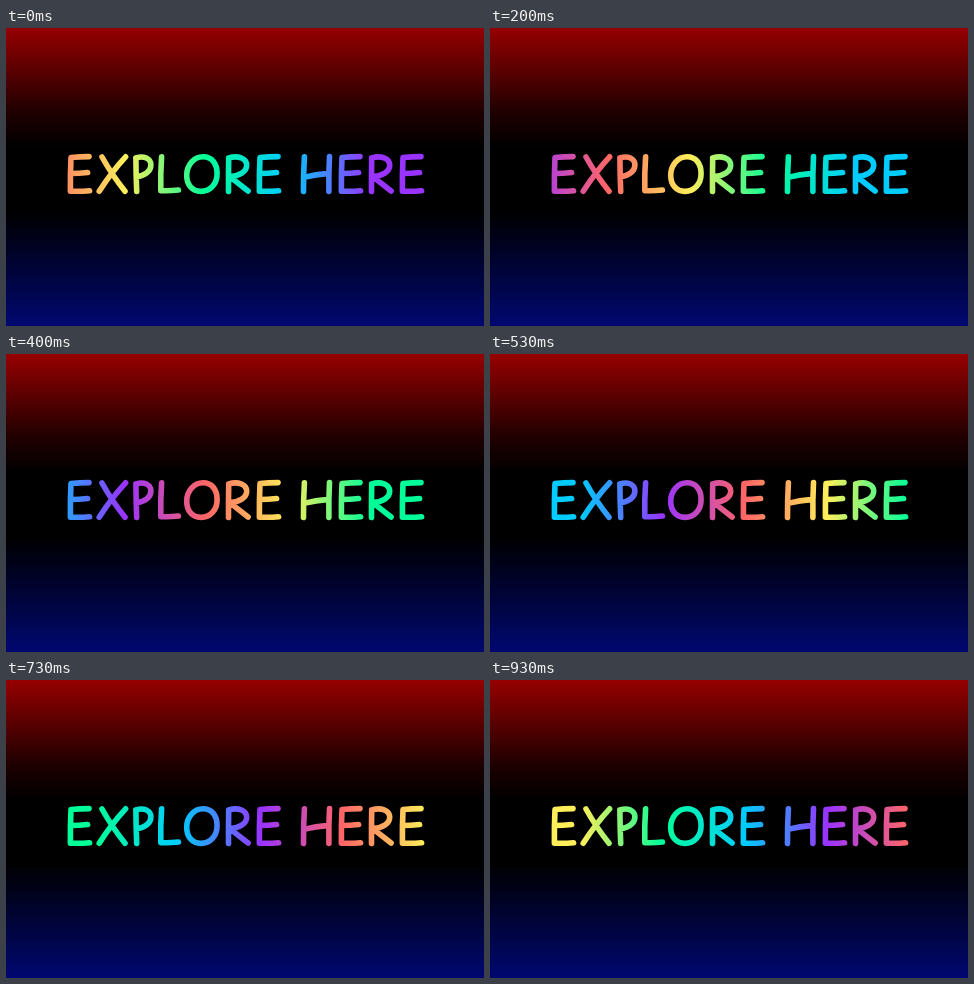
These frames come from a looping animation (478x298 px, 0.99 s). An HTML page:

```html
<!DOCTYPE html>
<html lang="en">
<head>
<meta charset="utf-8">
<title>Explore here</title>
<style>
  html, body { margin: 0; width: 100%; height: 100%; overflow: hidden; background: #000; }
  body { background: linear-gradient(#960000 0, #1e0000 85px, #000 120px, #000 182px, #000116 207px, #000870 298px); }
  svg { display: block; width: 478px; height: 298px; }
</style>
</head>
<body>
<svg viewBox="0 0 478 298" role="img" aria-label="EXPLORE HERE">
  <defs>
    <linearGradient id="rainbow" gradientUnits="userSpaceOnUse" y1="0" y2="0"></linearGradient>
  </defs>
  <path id="word" fill="none" stroke="url(#rainbow)" stroke-width="5.6" stroke-linecap="round" stroke-linejoin="round"/>
</svg>
<script>
  const LOOP = 990, STEPS = 15, PER_COLOR = 3;
  const COLORS = ['#ff6666', '#ffee5a', '#00ff99', '#00ccff', '#9933ff'];
  const LEFT = 36, GAP = 82;

  // Pen strokes of each letter, relative to its left edge and the cap line
  const GLYPHS = {
    E: 'm21 2.6 q-9 0 -18 .9 q-.8 16 -.6 33.6 q10 .4 19.2 -.4 m-18.6 -17.2 q8 -.2 16.6 -1',
    X: 'm6 3 q10 18 23 34.2 m.6 -34.4 q-14 15 -26.4 34.4',
    P: 'm3.4 4 q.1 17 .8 33.4 m-.8 -33.4 c8 -2.6 15 .4 15 7 c0 6.6 -6.6 10.8 -14.4 11.6',
    L: 'm3.6 2.8 q-1.2 17 -.8 33.8 q8 .5 17.6 -.6',
    O: 'm18.6 2.8 c-9 0 -16.4 8 -16.4 18.4 c0 9.6 5.6 16.2 14.2 16.2 c9.4 0 16.2 -7.4 16.2 -18 c0 -10 -5.4 -16.6 -14 -16.6',
    R: 'm3.2 4 q-.3 17 -.2 33.4 m.2 -33.4 c9 -2.8 18 0 18 7.2 c0 6.4 -7.4 10.8 -17 11.4 q9 7 18.4 14.4',
    H: 'm3.4 2.8 q-1 17 -.9 34.6 m26 -34.8 q-.9 17 -.6 34.8 m-25.2 -14 q12 -3 25 -4'
  };
  const LETTERS = [
    ['E', 62], ['X', 90], ['P', 126.5], ['L', 152], ['O', 178.5], ['R', 219.5], ['E', 251],
    ['H', 295], ['E', 333], ['R', 362.5], ['E', 394]
  ];
  document.getElementById('word').setAttribute('d',
    LETTERS.map(([c, x]) => `M${x} 126 ${GLYPHS[c]}`).join(' '));

  const gradient = document.getElementById('rainbow');
  const count = COLORS.length;
  const stops = COLORS.map((_, i) => {
    const stop = document.createElementNS(gradient.namespaceURI, 'stop');
    stop.setAttribute('offset', i / (count - 1));
    return gradient.appendChild(stop);
  });

  // The stops slide right by a third of a gap, then the colors rotate by one
  function paint(step) {
    const turn = Math.floor(step / PER_COLOR);
    const x = LEFT + (step % PER_COLOR) * GAP / PER_COLOR;
    gradient.setAttribute('x1', x);
    gradient.setAttribute('x2', x + GAP * (count - 1));
    stops.forEach((stop, i) =>
      stop.setAttribute('stop-color', COLORS[(i - turn + count) % count]));
  }

  // Each step begins at a multiple of 200/3 ms, rounded to 10 ms
  const starts = Array.from({ length: STEPS }, (_, i) => Math.round(i * 20 / 3) * 10);

  function tick() {
    const t = performance.now() % LOOP;
    paint(starts.filter(s => s <= t).length - 1);
    requestAnimationFrame(tick);
  }
  tick();
</script>
</body>
</html>
```
